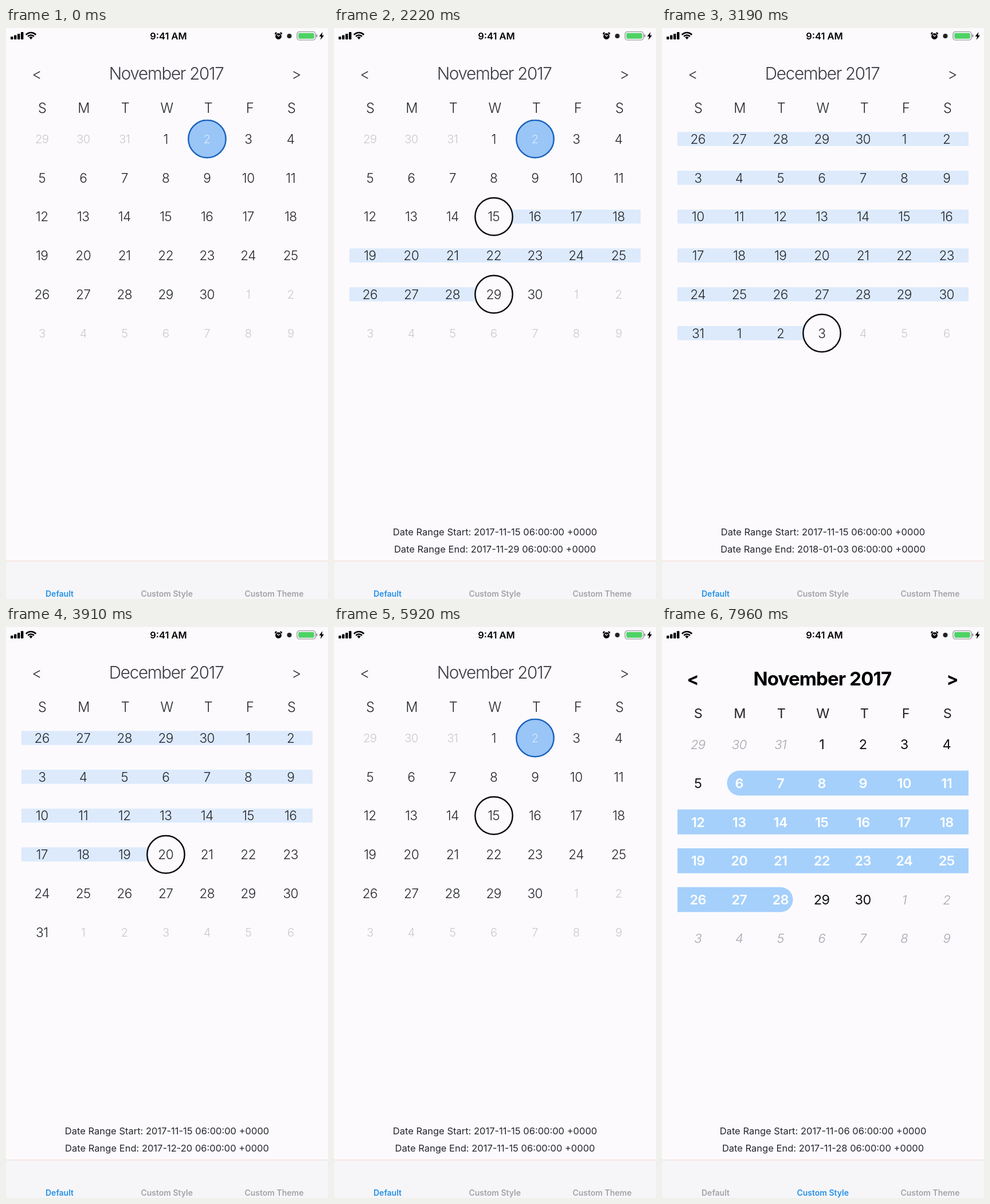
An HTML page with a canvas that plays this animation: 562x996 px, repeating every 8 s.

```html
<!DOCTYPE html>
<html lang="en">
<head>
<meta charset="utf-8">
<title>Calendar date range</title>
<style>
  html, body { margin: 0; height: 100%; overflow: hidden; background: #fcfafd; }
  canvas { display: block; width: 100vw; height: 100vh; }
</style>
</head>
<body>
<canvas id="stage" width="562" height="996"></canvas>
<script>
const ctx = document.getElementById('stage').getContext('2d');
const LOOP = 8000, PAPER = '#fcfafd', INK = '#26262d', BLUE = '#2490e8';
const ROW = 67.75, TOP = 193.5;
const DAY_X = [63, 135, 207, 279, 351, 423, 497];

// Days are counted from Sunday, October 29, 2017.
const dateOf = day => new Date(Date.UTC(2017, 9, 29 + day));
const nov = d => d + 2, dec = d => d + 32, jan = d => d + 63;
const TODAY = nov(2);

const SWITCH = 6500;
const PAGE_FORWARD = 2750, PAGE_BACK = 4870, PAGE_TIME = 300;

// Each drag starts on one day; its steps are [time, last selected day].
const DRAGS = [
  { custom: false, first: nov(9), steps: [
    [480, nov(9)], [660, nov(10)], [760, nov(17)], [860, nov(16)], [960, nov(22)]
  ] },
  { custom: false, first: nov(15), steps: [
    [1290, nov(15)], [1680, nov(16)], [1800, nov(22)], [2080, nov(29)], [2380, dec(6)],
    [2790, dec(20)], [2950, dec(27)], [3060, jan(3)],
    [3640, dec(27)], [3860, dec(20)], [4080, dec(19)], [4200, dec(12)], [4340, dec(11)],
    [4520, dec(4)], [4650, nov(27)], [4960, nov(20)], [5180, nov(15)]
  ] },
  { custom: true, first: nov(6), steps: [
    [6900, nov(6)], [7080, nov(7)], [7200, nov(14)], [7420, nov(21)], [7650, nov(28)]
  ] }
];

function selectionAt(t, custom) {
  const drag = DRAGS.findLast(d => d.custom === custom && t >= d.steps[0][0]);
  return drag && { first: drag.first, last: drag.steps.findLast(([at]) => t >= at)[1] };
}

const ease = (t, start) => {
  const p = Math.min(1, Math.max(0, (t - start) / PAGE_TIME));
  return p * p * (3 - 2 * p);
};

// Centres text on x, with its capitals centred on y.
function text(value, x, y, size, { weight = 400, color = INK, italic = '', tracking = 0 } = {}) {
  ctx.font = `${italic} ${weight} ${size}px Inter, sans-serif`;
  ctx.letterSpacing = `${tracking * size}px`;
  ctx.textAlign = 'center';
  ctx.fillStyle = color;
  ctx.fillText(value, x + tracking * size / 2, y + size * 0.364);
}

function rect(x, y, w, h, color, radius = 0) {
  ctx.fillStyle = color;
  ctx.beginPath();
  ctx.roundRect(x, y, w, h, radius);
  ctx.fill();
}

function circle(x, y, r, fill, stroke, width = 2.5) {
  ctx.beginPath();
  ctx.arc(x, y, r, 0, 7);
  if (fill) { ctx.fillStyle = fill; ctx.fill(); }
  if (stroke) { ctx.strokeStyle = stroke; ctx.lineWidth = width; ctx.stroke(); }
}

function polygon(points, color) {
  ctx.fillStyle = color;
  ctx.beginPath();
  points.forEach(p => ctx.lineTo(...p));
  ctx.fill();
}

function statusBar() {
  [5, 7.5, 10, 13].forEach((h, i) => rect(8 + i * 6, 20 - h, 4.4, h, '#000', 1));

  ctx.strokeStyle = '#000';
  ctx.lineWidth = 2.7;
  for (const r of [7, 11.5]) {
    ctx.beginPath();
    ctx.arc(43.5, 19.5, r, -Math.PI * 0.77, -Math.PI * 0.23);
    ctx.stroke();
  }
  polygon([[43.5, 20], [40.2, 16.2], [43.5, 14.8], [46.8, 16.2]], '#000');

  text('9:41 AM', 283.5, 14.2, 16.5, { weight: 600, color: '#000' });

  circle(471.3, 9.8, 2.2, '#000');
  circle(479.7, 9.8, 2.2, '#000');
  circle(475.5, 14.5, 5.8, '#000', PAPER, 1);
  ctx.strokeStyle = PAPER;
  ctx.lineWidth = 1.3;
  ctx.beginPath();
  ctx.moveTo(473, 12);
  ctx.lineTo(475.5, 14.5);
  ctx.lineTo(478.3, 12.8);
  ctx.stroke();

  circle(494.5, 14, 4, '#222');

  ctx.strokeStyle = '#8a8a8e';
  ctx.lineWidth = 1.2;
  ctx.beginPath();
  ctx.roundRect(508, 6.5, 32, 14.5, 4);
  ctx.stroke();
  rect(510.2, 8.7, 27.6, 10.1, '#4fd265', 2);
  rect(541.3, 11.2, 2, 5, '#8a8a8e', 1);
  polygon([[552.5, 7], [546.5, 14.8], [550, 14.8], [548.8, 20.8], [555, 12.7], [551.4, 12.7]], '#000');
}

function tabBar(active) {
  rect(0, 929, 562, 67, '#f6f5f8');
  rect(0, 929, 562, 1.3, '#f4dfd3');
  ['Default', 'Custom Style', 'Custom Theme'].forEach((label, i) =>
    text(label, 93.5 + i * 187.2, 986.7, 14, { weight: 600, color: i === active ? BLUE : '#a3a3a8' }));
}

function rangeLabels({ first, last }) {
  const stamp = day => dateOf(day).toISOString().slice(0, 10) + ' 06:00:00 +0000';
  text('Date Range Start: ' + stamp(first), 281, 879.3, 16.5);
  text('Date Range End: ' + stamp(last), 281, 909.3, 16.5);
}

function header(title, custom) {
  const style = custom
    ? { weight: 700, color: '#000', tracking: -0.026 }
    : { weight: 300, color: '#3a3a42', tracking: -0.044 };
  const y = custom ? 90 : 79.5, arrowSize = custom ? 31 : 26.5;
  text(title, 280.3, y, custom ? 33 : 29.6, style);
  text('<', 54, y + 0.6, arrowSize, style);
  text('>', 507, y + 0.6, arrowSize, style);
  [...'SMTWTFS'].forEach((letter, i) =>
    text(letter, 63.3 + i * 72.5, custom ? 150.5 : 139.5, 23.5, { weight: custom ? 400 : 300, color: '#222228' }));
}

function band(row, y, { first, last }, custom) {
  const from = Math.max(first, row * 7), to = Math.min(last, row * 7 + 6);
  if (from > to || (!custom && first === last)) return;
  const opens = from === first, closes = to === last;
  const inset = custom ? 21.5 : 0;
  const left = opens ? DAY_X[from % 7] - inset : 27;
  const right = closes ? DAY_X[to % 7] + inset : 535;
  const half = custom ? 21.7 : 12.3;
  const l = opens ? inset : 0, r = closes ? inset : 0;
  rect(left, y - half, right - left, half * 2, custom ? '#a5d0fb' : '#dceafc', [l, r, r, l]);
}

function defaultDay(day, x, y, inRange, isEdge, inMonth) {
  if (day === TODAY) circle(x, y, 32.7, '#99c5f7', '#1c64bd');
  if (isEdge) circle(x, y, 32.7, PAPER, '#0c0c10');
  const strong = inRange || inMonth;
  const color = day === TODAY ? '#dcebfc' : strong ? INK : '#c9c9ce';
  text(dateOf(day).getUTCDate(), x, y, strong && day !== TODAY ? 22.7 : 20.2,
    { weight: 300, color, tracking: -0.025 });
}

function customDay(day, x, y, inRange, inMonth) {
  const style = inRange ? { weight: 600, color: '#fff' }
    : inMonth ? { color: '#111116' }
    : { weight: 300, italic: 'italic', color: '#a6a6af' };
  text(dateOf(day).getUTCDate(), x, y, inRange || inMonth ? 23.5 : 22, { ...style, tracking: -0.025 });
}

function grid(top, scroll, month, selection, custom) {
  ctx.save();
  ctx.beginPath();
  ctx.rect(0, top - 34, 562, ROW * 6 + 1);
  ctx.clip();
  for (let row = 0; row < 11; row++) {
    const y = top + (row - scroll) * ROW;
    if (selection) band(row, y, selection, custom);
    DAY_X.forEach((x, column) => {
      const day = row * 7 + column;
      const inRange = selection && day >= selection.first && day <= selection.last;
      const isEdge = inRange && (day === selection.first || day === selection.last);
      const inMonth = dateOf(day).getUTCMonth() === month;
      if (custom) customDay(day, x, y, inRange, inMonth);
      else defaultDay(day, x, y, inRange, isEdge, inMonth);
    });
  }
  ctx.restore();
}

function draw(t) {
  const custom = t >= SWITCH;
  const december = t >= PAGE_FORWARD && t < PAGE_BACK;
  const scroll = 4 * (ease(t, PAGE_FORWARD) - ease(t, PAGE_BACK));
  const selection = selectionAt(t, custom);

  rect(0, 0, 562, 996, PAPER);
  statusBar();
  header(december ? 'December 2017' : 'November 2017', custom);
  grid(custom ? TOP + 11 : TOP, scroll, december ? 11 : 10, selection, custom);
  if (selection) rangeLabels(selection);
  tabBar(custom ? 1 : 0);
}

const start = performance.now();
function tick() {
  draw((performance.now() - start) % LOOP);
  requestAnimationFrame(tick);
}
tick();
</script>
</body>
</html>
```
